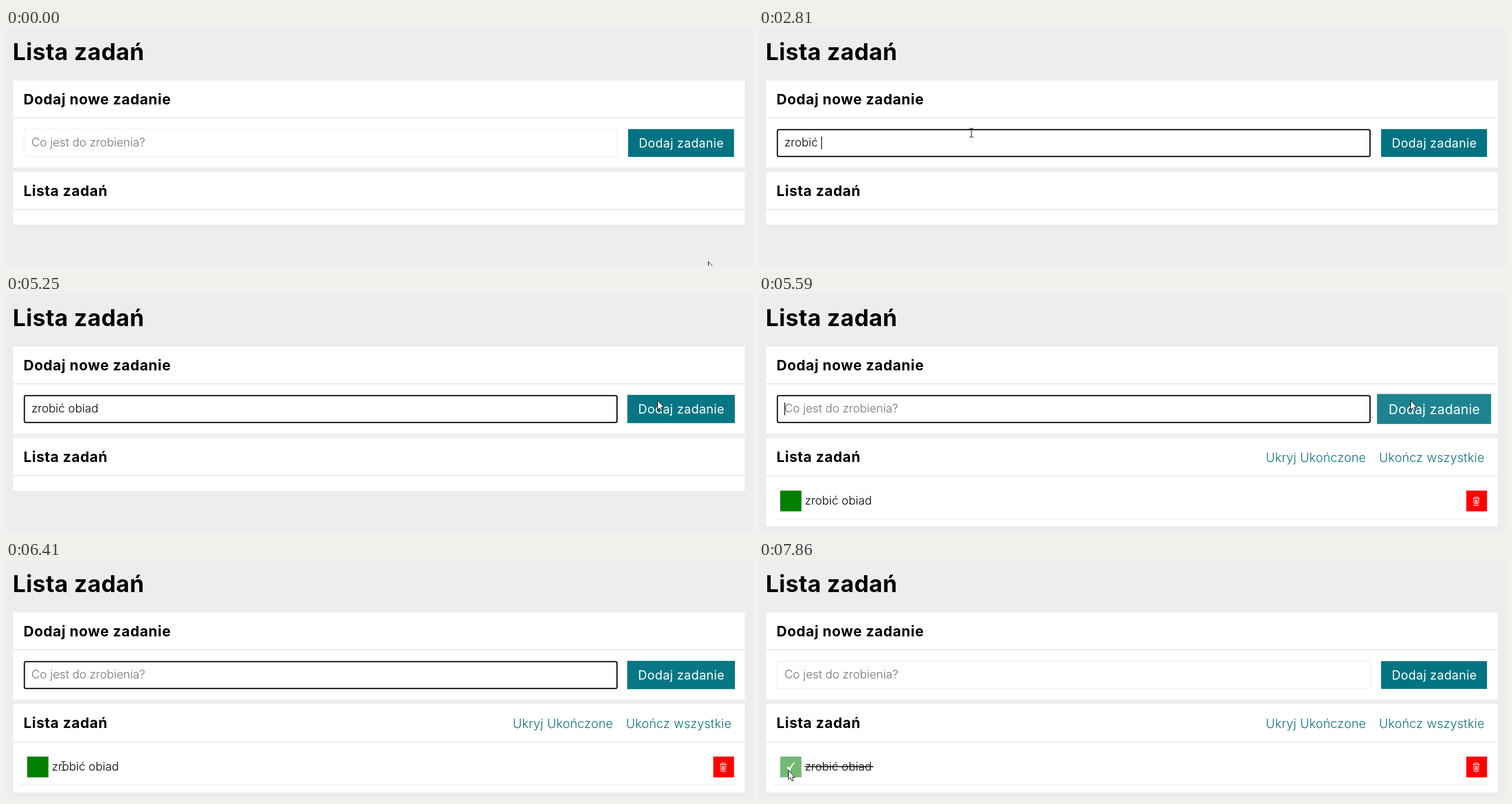
Recreate the animation shown at these times as an HTML page. Size 1280 by 408 pixels, loop 8 s.

```html
<!DOCTYPE html>
<html lang="pl">
<head>
<meta charset="utf-8">
<title>Lista zadań</title>
<style>
  html, body { margin: 0; width: 100%; height: 100%; overflow: hidden; background: #ededef; }
  svg { display: block; width: 100vw; height: 100vh; }
  text { font: 300 20px Inter, "Open Sans", sans-serif; white-space: pre; }
  .title { font-weight: 700; font-size: 39.500px; letter-spacing: .5px; }
  .head { font-weight: 700; font-size: 24.500px; letter-spacing: .7px; }
  .link { font-size: 21px; letter-spacing: .3px; fill: #0b707d; }
  .label { font-weight: 400; font-size: 21px; letter-spacing: .35px; fill: #fff; }
  .panel { fill: #fff; }
  .line { fill: #ebebec; }
</style>
</head>
<body>
<svg viewBox="0 0 1280 408">
  <text class="title" x="11.500" y="55">Lista zadań</text>

  <rect class="panel" x="12" y="90" width="1254" height="149"/>
  <text class="head" x="30" y="130.500">Dodaj nowe zadanie</text>
  <rect class="line" x="12" y="153" width="1254" height="2"/>
  <rect id="field" fill="#fff"/>
  <text id="value" x="43.500" y="203"></text>
  <rect id="caret" y="186" width="1.300" height="22"/>
  <g id="button">
    <rect id="face" x="1066" y="173.300" width="181.500" height="47.700" fill="#007382"/>
    <text class="label" x="1157.200" y="205.300" text-anchor="middle">Dodaj zadanie</text>
  </g>

  <rect id="list" class="panel" x="12" y="247" width="1254"/>
  <text class="head" x="30" y="287.500">Lista zadań</text>
  <rect id="rule" class="line" x="12" width="1254" height="2"/>
  <g id="task">
    <text class="link" x="868.500" y="287.500">Ukryj Ukończone</text>
    <text class="link" x="1062.500" y="287.500">Ukończ wszystkie</text>
    <rect id="box" x="36.300" y="337" width="36.400" height="35.600" fill="#008000"/>
    <path id="tick" d="M48.500 356l4 5.500q3-9 8.500-14.500q-6 5-8.800 11.500l-2-3.500z" fill="#fff" stroke="#fff" stroke-width="1.300"/>
    <text x="78.500" y="361">zrobić obiad</text>
    <rect id="strike" x="78.500" y="353.500" width="117.500" height="1.600"/>
    <rect x="1212" y="337" width="35.500" height="35.600" fill="#f00"/>
    <path d="M1223.500 350.500h11M1224.500 350q0-2 4.500-2t4.500 2M1224.500 351l1 11.500h7l1-11.500M1227.300 352.500l.4 8M1229 352.500v8M1230.700 352.500l-.4 8" fill="none" stroke="#fff"/>
    <rect class="line" x="24" y="385" width="1230" height="1"/>
  </g>

  <path id="arrow" d="M.5 .5V16.500L4 13.300L6.500 19L9 17.800L6.500 12.300H11.500Z" fill="#fff" stroke="#000"/>
  <path id="beam" d="M-3.500-7.500H-1L0-6.500L1-7.500H3.500M0-6.500V6.500M-3.500 7.500H-1L0 6.500L1 7.500H3.500" fill="none" stroke="#222" stroke-width="1.200"/>
</svg>
<script>
const LOOP = 8000, PHRASE = "zrobić obiad", HINT = "Co jest do zrobienia?";
const KEYS = [1340, 1690, 1820, 2090, 2150, 2610, 2810, 3350, 3680, 3750, 3950, 4220];
const FOCUS = 480, SUBMIT = 5530, BLUR = 7050;
const ENTER = 5118, LEAVE = 5910;

// Pointer stops: time, x, y
const STOPS = [
  [20, 1203, 400], [340, 362, 180], [420, 362, 180], [480, 362, 173], [540, 362, 179.5],
  [730, 362, 179.5], [740, 364, 179.5], [4640, 364, 179.5], [4850, 600, 175],
  [5190, 1116, 182], [5800, 1116, 182], [5910, 1062, 196], [6340, 128, 348],
  [6410, 98.5, 353], [6620, 50, 360], [LOOP, 50, 360]
];

const $ = id => document.getElementById(id);
const set = (id, attrs) => { for (const k in attrs) $(id).setAttribute(k, attrs[k]); };
const show = (id, on) => set(id, { visibility: on ? "visible" : "hidden" });
const clamp = v => Math.min(1, Math.max(0, v));
const mix = (a, b, k) => a + (b - a) * k;
const tint = (rgb, k) => `rgb(${rgb.map(c => Math.round(mix(c, 255, k)))})`;

// CSS "ease" curve, solved by bisection
function ease(p) {
  p = clamp(p);
  let lo = 0, hi = 1;
  for (let i = 0; i < 20; i++) {
    const s = (lo + hi) / 2;
    const x = .75 * s * (1 - s) + s ** 3;
    if (x < p) lo = s; else hi = s;
  }
  return .3 * lo * (1 - lo) ** 2 + 3 * lo * lo * (1 - lo) + lo ** 3;
}

function pointer(t) {
  const i = STOPS.findIndex(s => s[0] > t);
  if (i < 1) return STOPS[0].slice(1);
  const [t0, x0, y0] = STOPS[i - 1], [t1, x1, y1] = STOPS[i];
  const k = (t - t0) / (t1 - t0);
  return [mix(x0, x1, k), mix(y0, y1, k)];
}

function drawField(t) {
  const focused = t >= FOCUS && t < BLUR;
  set("field", focused
    ? { x: 31.5, y: 174.3, width: 1015.5, height: 46, rx: 2.5, stroke: "#000", "stroke-width": 2 }
    : { x: 31, y: 173.5, width: 1016.5, height: 47, rx: 0, stroke: "#ebebec", "stroke-width": 1 });

  const typed = t < SUBMIT ? PHRASE.slice(0, KEYS.filter(k => k <= t).length) : "";
  const value = $("value");
  value.textContent = typed || HINT;
  set("value", { fill: typed ? "#000" : "#757575" });

  const last = [FOCUS, ...KEYS, SUBMIT].filter(k => k <= t).pop();
  show("caret", focused && (t - last) % 1060 < 530);
  set("caret", { x: 43.5 + (typed ? value.getComputedTextLength() : 0) });
}

function drawButton(t) {
  const hover = t < LEAVE
    ? ease((t - ENTER) / 1000)
    : ease((LEAVE - ENTER) / 1000) * (1 - ease((t - LEAVE) / 960));
  set("button", { transform: `translate(1156.5 197.3) scale(${1 + .1 * hover}) translate(-1156.5 -197.3)` });
  set("face", { fill: tint([0, 115, 130], .15 * hover) });
}

function drawList(t) {
  const added = t >= SUBMIT, done = t >= BLUR;
  set("list", { height: added ? 151.5 : 90 });
  set("rule", { y: added ? 311 : 310 });
  set("task", { display: added ? "inline" : "none" });
  const glow = .2 * ease((t - 6520) / 390) + .25 * ease((t - BLUR) / 740);
  set("box", { fill: tint([0, 128, 0], glow) });
  show("tick", added && done);
  show("strike", added && done);
}

function drawPointer(t) {
  const [x, y] = pointer(t);
  const overField = x > 31 && x < 1048 && y > 172 && y < 221;
  const overTask = t >= SUBMIT && x > 78 && x < 196 && y > 340 && y < 368;
  const text = overField || overTask;
  show("beam", text);
  show("arrow", !text);
  set(text ? "beam" : "arrow", { transform: `translate(${x} ${y})` });
}

function frame(now) {
  const t = now % LOOP;
  drawField(t);
  drawButton(t);
  drawList(t);
  drawPointer(t);
  requestAnimationFrame(frame);
}
frame(0);
</script>
</body>
</html>
```
